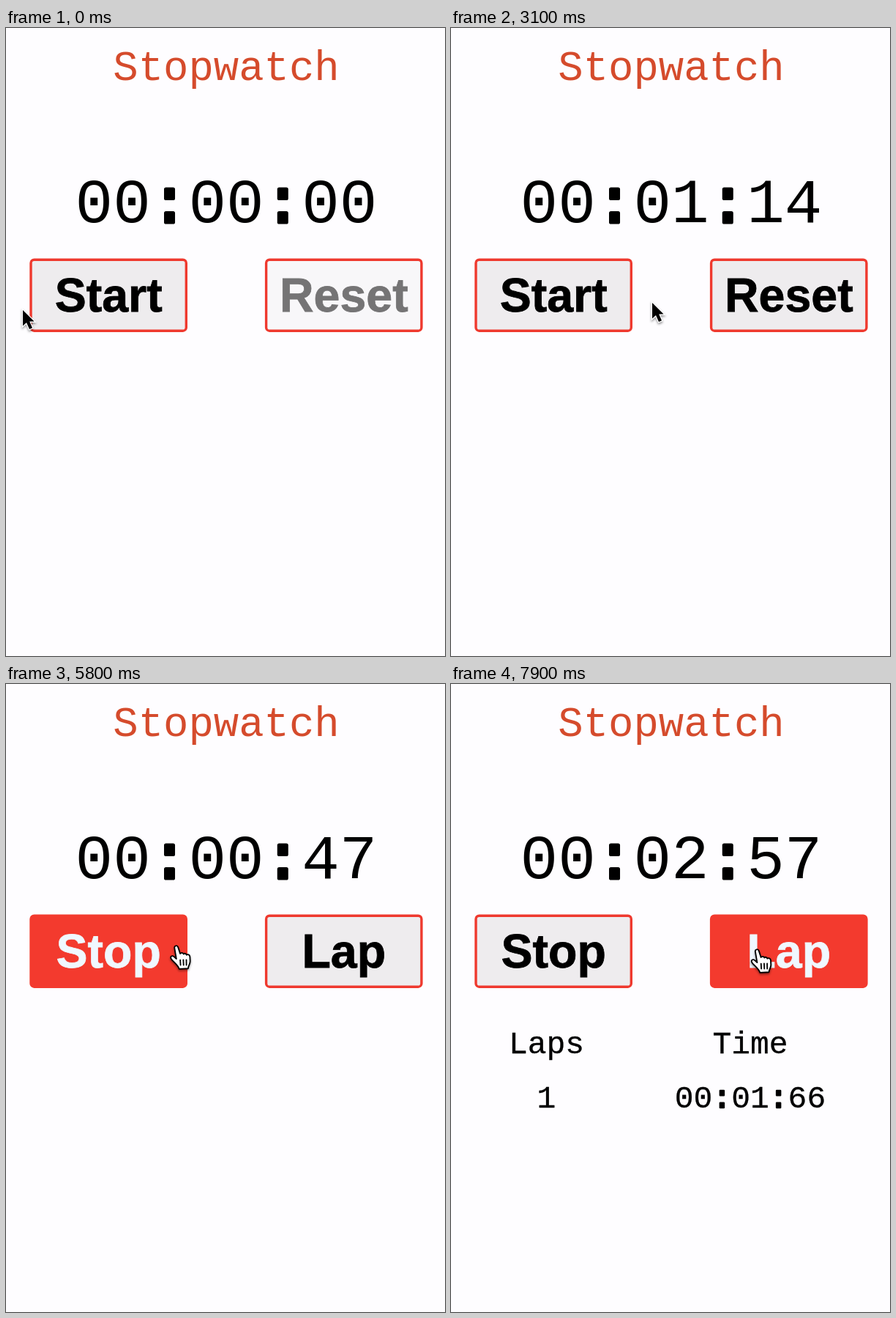
An HTML page for the animation above (8 s loop, 600 by 857 pixels).

```html
<!DOCTYPE html>
<html lang="en">
<head>
<meta charset="utf-8">
<title>Stopwatch</title>
<style>
  html, body { margin: 0; width: 100%; height: 100%; overflow: hidden; background: #fefdff; }
  svg { display: block; width: 100vw; height: 100vh; }
  text { text-anchor: middle; white-space: pre; }
  .mono { font: 43px "Liberation Mono", "DejaVu Sans Mono", monospace; stroke: #000; stroke-width: .3px; }
  .title { font-size: 57.3px; fill: #d54b2c; stroke: none; }
  #clock { font-size: 86px; stroke: none; }
  .colon { stroke: #000; stroke-width: .06em; stroke-linejoin: round; }
  .button rect { fill: #eeecee; stroke: #ef392e; stroke-width: 3.4; }
  .button text {
    font: bold 64.5px "Liberation Sans", Arial, sans-serif;
    fill: #000; stroke: #000; stroke-width: .8px;
  }
  .button.disabled rect { fill: #f8f7f9; }
  .button.disabled text { fill: #757475; stroke: #757475; }
  .button.hover rect { fill: #f33a2e; stroke: #f33a2e; }
  .button.hover text { fill: #f0f8ff; stroke: #f0f8ff; }
  #cursor { filter: drop-shadow(0 2px 1.5px rgba(0, 0, 0, .4)); }
  .hidden { display: none; }
</style>
</head>
<body>
<svg viewBox="0 0 600 857">
  <text class="mono title" x="301" y="71">Stopwatch</text>
  <text class="mono" id="clock" x="301" y="265"></text>

  <g class="button" id="left">
    <rect x="34" y="316.2" width="212.3" height="97" rx="4.5"/>
    <text x="140.2" y="387.3">Start</text>
  </g>
  <g class="button" id="right">
    <rect x="355.6" y="316.2" width="212.3" height="97" rx="4.5"/>
    <text x="461.8" y="387.3">Reset</text>
  </g>

  <g id="laps" class="hidden">
    <text class="mono" x="130.5" y="504">Laps</text>
    <text class="mono" x="409" y="504">Time</text>
    <text class="mono" x="130.5" y="578">1</text>
    <text class="mono" x="409" y="578" id="lapTime"></text>
  </g>

  <g id="cursor">
    <path id="arrow" d="M0 0V21.5L5 17 9 26 13 24.3 9.2 15.6H15.6Z"
      fill="#000" stroke="#fff" stroke-width="2.6" paint-order="stroke"/>
    <g id="hand" transform="scale(1.06)" stroke="#000" stroke-width="1.7" stroke-linecap="round" stroke-linejoin="round">
      <path fill="#fff" d="M-2 3C-2.5-.2 1.6-.8 2.6 2L5.3 10.4C6.4 8.6 9.2 9 9.6 11
        10.7 9.6 13 10 13.5 12 15 10.8 17.6 11.6 17.9 14.2L18.2 20C18.2 24 15.8 25.5 15.6 29.5
        L4 30C3.4 26-2 22-5.6 18-8.6 14.6-5.2 11.6-2.4 14.4L.4 17Z"/>
      <path fill="none" d="M5.4 18.5l.4 6.5M9.4 18.3l.3 6.7M13.3 18.2l.1 6.8"/>
    </g>
    <g id="forbidden" fill="none">
      <circle cx="17" cy="39" r="13.5" fill="#eee" fill-opacity=".7" stroke="#a5a5a5" stroke-width="6"/>
      <path d="M7.5 29.5l19 19" stroke="#a5a5a5" stroke-width="6"/>
      <circle cx="17" cy="39" r="13.5" stroke="#f2f2f2" stroke-width="4"/>
      <path d="M7.5 29.5l19 19" stroke="#f2f2f2" stroke-width="4"/>
    </g>
  </g>
</svg>
<script>
  const LOOP = 8000, STEP = 100;
  const $ = id => document.getElementById(id);

  const ease = {
    inOut: u => u * u * (3 - 2 * u),
    in: u => u * u,
    out: u => u * (2 - u)
  };

  // Pointer path: time, x, y, easing towards this point
  const path = [
    [0, 23, 385],
    [100, 23, 385, 'inOut'],
    [700, 91, 375, 'inOut'],
    [2700, 91, 375, 'inOut'],
    [3100, 275, 375, 'in'],
    [3550, 452, 357, 'out'],
    [3900, 452, 357, 'inOut'],
    [4500, 156, 355, 'inOut'],
    [5550, 156, 355, 'inOut'],
    [6250, 418, 362, 'inOut'],
    [LOOP, 418, 362, 'inOut']
  ];

  // Clicks on the buttons
  const START_1 = 950, STOP = 2090, RESET = 3700, START_2 = 5330, LAP = 6990;

  function pointerAt(t) {
    const i = path.findIndex(key => key[0] > t);
    const [t0, x0, y0] = path[i - 1], [t1, x1, y1, name] = path[i];
    const u = ease[name]((t - t0) / (t1 - t0));
    return [x0 + (x1 - x0) * u, y0 + (y1 - y0) * u];
  }

  function elapsedAt(t) {
    if (t >= START_2) return t - START_2;
    if (t >= RESET || t < START_1) return 0;
    return Math.min(t, STOP) - START_1;
  }

  function format(ms) {
    const cs = Math.floor(ms / 10);
    return [cs / 6000, cs / 100 % 60, cs % 100]
      .map(n => String(Math.floor(n)).padStart(2, '0'))
      .join('<tspan class="colon">:</tspan>');
  }

  function setButton(id, label, hover, disabled) {
    const button = $(id);
    button.querySelector('text').textContent = label;
    button.classList.toggle('hover', hover && !disabled);
    button.classList.toggle('disabled', disabled);
  }

  const show = (id, on) => $(id).classList.toggle('hidden', !on);

  function draw(t) {
    const [x, y] = pointerAt(t);
    const running = t >= START_1 && t < STOP || t >= START_2;
    const blank = t < START_1 || t >= RESET && t < START_2;
    const onLeft = x >= 32 && x <= 248;
    const onRight = x >= 354 && x <= 570;
    const hand = onLeft || onRight && !blank;

    $('clock').innerHTML = format(elapsedAt(t));
    setButton('left', running ? 'Stop' : 'Start', onLeft, false);
    setButton('right', running ? 'Lap' : 'Reset', onRight, blank);
    show('laps', t >= LAP);
    show('hand', hand);
    show('arrow', !hand);
    show('forbidden', onRight && blank);
    $('cursor').setAttribute('transform', `translate(${x.toFixed(1)} ${y.toFixed(1)})`);
  }

  const begin = performance.now();
  function tick() {
    const t = (performance.now() - begin) % LOOP;
    draw(Math.floor(t / STEP) * STEP);
    requestAnimationFrame(tick);
  }

  $('lapTime').innerHTML = format(elapsedAt(LAP));
  draw(0);
  requestAnimationFrame(tick);
</script>
</body>
</html>
```
